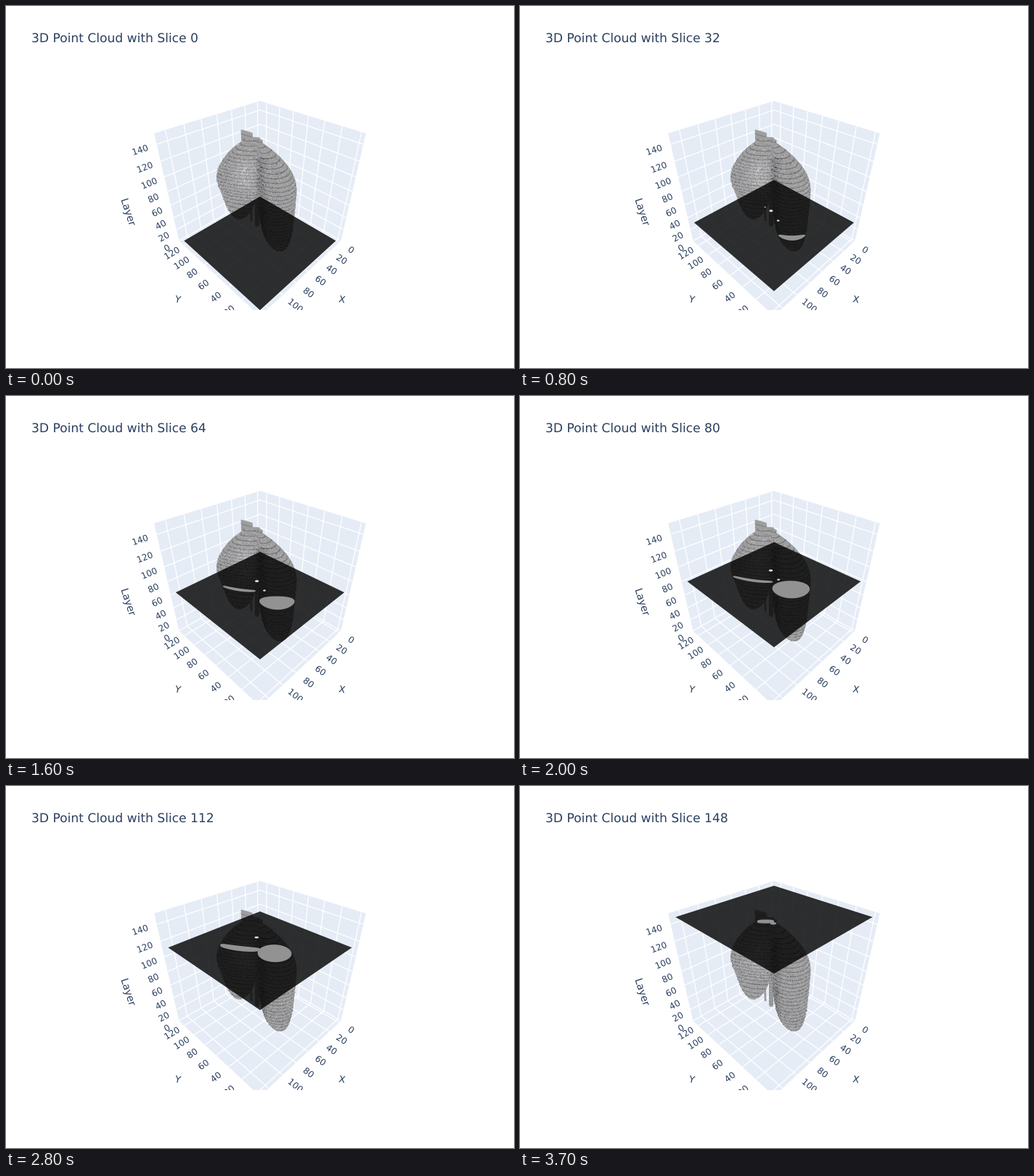
Animation, 700 px wide and 500 px high, one loop 3800 ms. Source, as a matplotlib script:

```python
import numpy as np
import matplotlib.pyplot as plt
from matplotlib.animation import FuncAnimation
from matplotlib.collections import LineCollection, PolyCollection
from matplotlib.patches import PathPatch, Polygon, Rectangle
from matplotlib.textpath import TextPath
from matplotlib.transforms import Affine2D

W, H, DPI = 700, 500, 100
FRAMES, STEP = 38, 4
INK, WALL = "#2a3f5f", "#E5ECF6"
PX = 72 / DPI
FOCAL = 160 / np.tan(np.pi / 8)
EYE = 1.25 * np.sqrt(3)
HALF, PLANE = 0.5, 0.47
Z_MAX, XY_MAX = 152, 127
TURN = np.linspace(0, np.pi, 25)


def project(a, b, z):
    depth = EYE - (a + b + z) / np.sqrt(3)
    return (W / 2 + FOCAL * (b - a) / np.sqrt(2) / depth,
            260 - FOCAL * (2 * z - a - b) / np.sqrt(6) / depth)


def height(layer):
    return layer / Z_MAX - HALF


def ribbon(layer, left, right, middle, thick, blunt=1.0):
    """Back and front edge of a flat section; p runs to the right, q to the viewer."""
    p = left + (right - left) * (1 - np.cos(TURN)) / 2
    spread = thick * np.abs(np.sin(TURN)) ** blunt
    edges = []
    for q in (middle - spread, middle + spread):
        edges.append(np.c_[project((q - p) / np.sqrt(2), (q + p) / np.sqrt(2), height(layer))])
    return edges


def taper(layer):
    return np.clip((layer - 90) / 58, 0, 1) ** 1.8


def lobe(layer):
    top = taper(layer)
    foot = max(1 - ((layer - 96) / 83) ** 2, 0) ** 0.3 if layer < 96 else 1
    radius = 0.14 * foot - 0.12 * top
    thick = min(0.14 * np.clip((layer - 10) / 86, 0.25, 1) ** 1.2, radius)
    bend = 0.4 * max(radius - thick, 0) * np.cos(TURN) ** 2
    right = 0.125 + 0.14 * foot ** 0.5 - 0.25 * top
    return ribbon(layer, right - 2 * radius, right, 0.21 - 0.09 * top - thick - bend, thick)


def sheet(layer):
    top = taper(layer)
    width = np.sqrt(max(1 - ((layer - 98) / 57) ** 2, 0)) if layer < 98 else 1
    hollow = 0.04 * np.exp(-((layer - 66) / 14) ** 2)
    curl = 0.08 * (1 + np.cos(TURN)) ** 2 / 4
    thick = 0.018 + 0.05 * np.exp(-((layer - 132) / 20) ** 2) - 0.015 * top ** 4
    return ribbon(layer, -0.18 - 0.15 * width + 0.22 * top, -0.18 + 0.18 * width,
                  0.02 + 0.05 * top - hollow - curl * width * (1 - top), thick, 0.5)


def spur(layer):
    return ribbon(layer, -0.145, -0.055, -0.23 - 0.033 * np.cos(TURN), 0.013, 0.5)


def rod(p, q, radius):
    return lambda layer: ribbon(layer, p - radius, p + radius, q, radius)


# Each part: first layer, last layer, section.
BODY = [(42, 151, sheet), (14, 151, lobe)]
RODS = [(8, 40, rod(-0.08, -0.21, 0.007)), (6, 118, rod(-0.026, -0.157, 0.016)),
        (20, 90, rod(0.035, -0.025, 0.011))]
SPUR = [(126, 139, spur)]


def outlines(parts, layer):
    found = []
    for first, last, section in parts:
        if first <= layer <= last:
            back, front = section(layer)
            found.append(np.concatenate([back, front[::-1]]))
    return found


fig = plt.figure(figsize=(W / DPI, H / DPI), dpi=DPI, facecolor="white")
ax = fig.add_axes([0, 0, 1, 1])
ax.axis("off")


def text_path(text, size):
    return TextPath((0, 0), text, size=size, prop={"family": "DejaVu Sans"})


def label(spot, text, angle, size=12):
    path = text_path(text, size)
    box = path.get_extents()
    place = (Affine2D().translate(-(box.x0 + box.x1) / 2, -(box.y0 + box.y1) / 2)
             .rotate_deg(angle).scale(1, -1).translate(*spot))
    ax.add_patch(PathPatch(place.transform_path(path), fc=INK, lw=0, zorder=6))


def draw_box():
    h = HALF
    for axis in range(3):
        square = [(-h, -h), (h, -h), (h, h), (-h, h)]
        corners = [project(*np.insert(point, axis, -h)) for point in square]
        ax.add_patch(Polygon(corners, fc=WALL, ec=WALL, lw=0.3, zorder=1))
    lines = []
    for value in range(0, 121, 20):
        a = -PLANE + 2 * PLANE * value / XY_MAX
        lines += [[(a, -h, -h), (a, -h, h)], [(a, -h, -h), (a, h, -h)],
                  [(-h, -a, -h), (-h, -a, h)], [(-h, -a, -h), (h, -a, -h)]]
    for value in range(0, 141, 20):
        z = height(value)
        lines += [[(-h, -h, z), (h, -h, z)], [(-h, -h, z), (-h, h, z)]]
    ax.add_collection(LineCollection([[project(*p) for p in line] for line in lines],
                                     colors="white", linewidths=1.3 * PX, zorder=2), autolim=False)


def draw_labels():
    h = HALF

    def tick(edge, outward, value):
        start = np.array(project(*edge))
        spot = np.array(project(*np.add(edge, outward)))
        dx, dy = spot - start
        label(spot, str(value), -np.degrees(np.arctan(dy / dx)))

    gap, far = 0.12, h + 0.32
    for value in range(0, 121, 20):
        a = -PLANE + 2 * PLANE * value / XY_MAX
        tick((a, h, -h), (0, gap, 0), value)
        tick((h, -a, -h), (gap, 0, 0), value)
    for value in range(0, 141, 20):
        tick((h, -h, height(value)), (gap, 0, 0), value)
    label(project(far, -h, 0), "Layer", -72, 14)
    label(project(far, 0, -h), "Y", -12, 13)
    label(project(0, far, -h), "X", -10, 13)
    ax.add_patch(Rectangle((0, 420), W, H - 420, fc="white", ec="none", zorder=10))


def draw_cloud():
    rng = np.random.default_rng(4)
    layers = range(4, Z_MAX)
    shapes, tones = [], []
    for group in (RODS, SPUR, BODY):
        for n in layers:
            found = outlines(group, n)
            shapes += found
            tones += [str(0.5 if n % 5 == 0 else 0.62)] * len(found)
    ax.add_collection(PolyCollection(shapes, facecolors=tones, edgecolors=tones,
                                     linewidths=0.5 * PX, zorder=3), autolim=False)

    # Dots along the front rim of every layer.
    dots, gray = [], []
    for n in layers:
        for first, last, section in BODY:
            if not first <= n <= last:
                continue
            front = section(n)[1]
            x = np.arange(front[0, 0], front[-1, 0], 2.0)
            x = x + rng.uniform(-0.8, 0.8, len(x))
            y = np.interp(x, front[:, 0], front[:, 1]) - 0.4
            glow = 0.13 * np.exp(-((x - 329) / 15) ** 2 - ((y - 233) / 22) ** 2)
            ridge = 0.15 * np.exp(-((x - 352) / 6) ** 2) * (y > 210)
            stripe = 0.18 if n % 5 == 0 else 0.0
            dots.append(np.c_[x, y])
            gray.append(0.63 + glow - ridge - stripe + rng.normal(0, 0.05, len(x)))
    gray = np.concatenate(gray).clip(0, 0.98)
    colors = np.c_[gray, gray, gray + 0.01, np.full(len(gray), 0.6)]
    ax.scatter(*np.concatenate(dots).T, s=1.5, marker="s", c=colors, linewidths=0, zorder=3.5)


draw_box()
draw_cloud()
draw_labels()
ax.set_xlim(0, W)
ax.set_ylim(H, 0)

title = ax.add_patch(PathPatch(text_path("3", 17), fc=INK, lw=0, zorder=12))
plane = ax.add_patch(Polygon(np.zeros((4, 2)), fc="black", ec="none", alpha=0.81, zorder=7))
bone = PolyCollection([], facecolors="#929292", edgecolors="none", zorder=8)
cores = PolyCollection([], facecolors="#dcdcdc", edgecolors="none", zorder=9)
ax.add_collection(bone, autolim=False)
ax.add_collection(cores, autolim=False)


def update(frame):
    layer = STEP * frame
    heading = text_path(f"3D Point Cloud with Slice {layer}", 17.1)
    title.set_path(Affine2D().scale(1, -1).translate(35, 50).transform_path(heading))
    p, z = PLANE, height(layer)
    plane.set_xy([project(a, b, z) for a, b in ((-p, -p), (p, -p), (p, p), (-p, p))])
    bone.set_verts(outlines(BODY + SPUR, layer))
    cores.set_verts(outlines(RODS, layer))
    return title, plane, bone, cores


anim = FuncAnimation(fig, update, frames=FRAMES, interval=100, repeat=True, repeat_delay=0)
plt.show()
```
